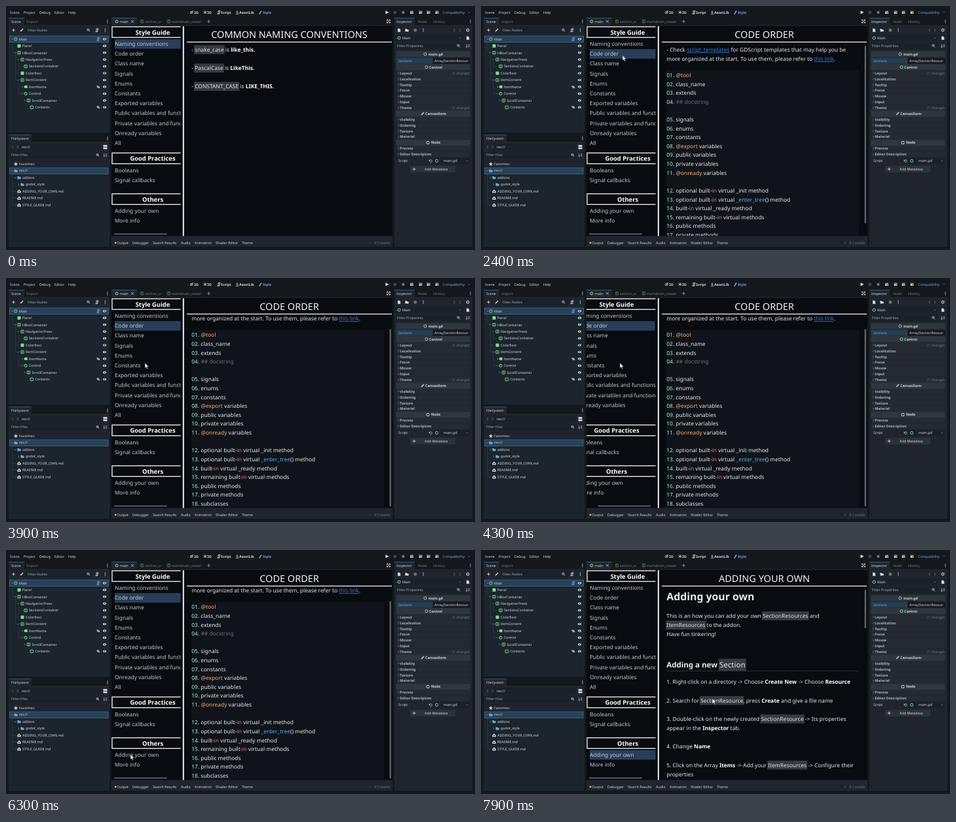
Write an HTML page that moves like this. It is 716 by 374 pixels and loops after 8000 ms.

```html
<!DOCTYPE html>
<html lang="en">
<head>
<meta charset="utf-8">
<title>Style guide addon</title>
<style>
html, body { margin: 0; width: 100%; height: 100%; overflow: hidden; background: #14181d; }
svg { display: block; width: 716px; height: 374px; font: 5.35px "Noto Sans", "Open Sans", sans-serif; text-rendering: geometricPrecision; }
text { fill: #d4d7da; white-space: pre; }
.dim { fill: #747a82; }
.hint { fill: #a3a9af; }
.blue { fill: #6ba9e0; }
.mid { text-anchor: middle; }
.bold { font-weight: 700; }
.sec { font-weight: 700; fill: #b4b8bd; }
.nav { font-size: 8.42px; fill: #c6c8ca; }
.head { font-size: 9.4px; font-weight: 700; fill: #fff; text-anchor: middle; }
.title { font-size: 14.5px; fill: #f4f5f6; text-anchor: middle; }
.body { font-size: 8.42px; fill: #e8eaec; }
.h1 { font-size: 15.8px; font-weight: 700; }
.h2 { font-size: 11.5px; font-weight: 700; }
.b { font-weight: 700; fill: #fff; }
.k { font-weight: 500; fill: #e2e4e6; }
.link { fill: #2f7fdc; text-decoration: underline; }
.num { fill: #a5efd5; }
.ann { fill: #f5ac70; }
.key { fill: #f56c80; }
.fn { fill: #57b0f8; }
.com { fill: #6b7077; }
</style>
</head>
<body>
<svg id="stage" viewBox="0 0 716 374"></svg>
<script>
const GREEN = '#83dd8c', LIGHT = '#d4d7da', GRAY = '#6d737b', BLUE = '#6ba9e0';
const OUTER = '#14181d', PANEL = '#20252d', WELL = '#1c252e', FIELD = '#1a2129', ACCENT = '#3f6f9c';
const marks = { '*': 'b', '`': 'k', '~': 'link', '^': 'num', '!': 'ann', '%': 'key', '$': 'fn', ';': 'com' };

// ---- drawing helpers, all returning markup ----
const rect = (x, y, x2, y2, fill, more = '') =>
  `<rect x="${x}" y="${y}" width="${x2 - x}" height="${y2 - y}" fill="${fill}" ${more}/>`;
const line = (d, c = LIGHT, w = 0.8) => `<path d="${d}" fill="none" stroke="${c}" stroke-width="${w}"/>`;
const shape = (d, c = LIGHT) => `<path d="${d}" fill="${c}"/>`;
const text = (x, y, s, cls = '', drop = 1.9) => `<text x="${x}" y="${y + drop}" class="${cls}">${s}</text>`;
const rich = s => s.replace(/([*`~^!%$;])(.+?)\1/g, (m, c, w) => `<tspan class="${marks[c]}">${w}</tspan>`);
const body = (y, s, cls = '') => text(283.3, y, rich(s), 'body ' + cls, cls == 'h1' ? 5.4 : cls ? 4 : 2.9);
const picked = (y, x2) => rect(5.3, y - 4.8, x2, y + 4.8, '#28405a', 'stroke="#477a9f" stroke-width=".6"');
const tab = (x, y, x2) => rect(x, y, x2, y + 11, PANEL) + rect(x, y, x2, y + .7, ACCENT);

const dot = (x, y, r, c) => `<circle cx="${x}" cy="${y}" r="${r}" fill="${c}"/>`;
const ring = (x, y, c = GREEN, r = 2.1) => `<circle cx="${x}" cy="${y}" r="${r}" fill="none" stroke="${c}" stroke-width="1"/>`;
const box = (x, y, c = GREEN) => rect(x - 2.2, y - 2.2, x + 2.2, y + 2.2, 'none', `rx=".5" stroke="${c}" stroke-width=".9"`);
const bars = (x, y, c = GREEN) => box(x, y, c) + line(`M${x} ${y - 2}v4`, c);
const solid = (x, y) => rect(x - 2.5, y - 2.5, x + 2.5, y + 2.5, GREEN, 'rx=".6"');
const tag = (x, y) => shape(`M${x - 2.8} ${y}l1.8-2.2h3.6v4.4h-3.6z`, GREEN);
const down = (x, y, c = '#8f959c') => line(`M${x - 1.3} ${y - .6}l1.3 1.3 1.3-1.3`, c, .7);
const right = (x, y, c = '#8f959c') => line(`M${x - .6} ${y - 1.3}l1.3 1.3-1.3 1.3`, c, .7);
const plus = (x, y, c = LIGHT) => line(`M${x - 2.4} ${y}h4.8M${x} ${y - 2.4}v4.8`, c, .9);
const dots = (x, y) => [-2, 0, 2].map(d => dot(x, y + d, .65, LIGHT)).join('');
const lens = (x, y) => ring(x - .6, y - .6, LIGHT, 1.5) + line(`M${x + .6} ${y + .6}l1.7 1.7`);
const eye = (x, y) => `<ellipse cx="${x}" cy="${y}" rx="2.7" ry="1.8" fill="${LIGHT}"/>` + dot(x, y, .9, WELL);
const scroll = (x, y, c = LIGHT) => line(`M${x - 1} ${y + 2.3}v-4.4h3.4M${x - 2.6} ${y + 2.3}h3.6v-4.4`, c, 1);
const folder = (x, y, c = '#68a9dc') => shape(`M${x - 2.6} ${y - 2.1}h2.2l.8 1h2.2v3.4h-5.2z`, c);
const page = (x, y, c = LIGHT) => shape(`M${x - 2} ${y - 2.6}h2.6l1.6 1.6v3.8h-4.2z`, c);
const readme = (x, y) => shape(`M${x - 2.6} ${y}l2.6-2.7 2.6 2.7v2.6h-5.2z`) + dot(x, y + .6, 1, '#333a42');
const sort = (x, y) => line(`M${x - 1.6} ${y - 2.4}v4.8m-1.2-1.3l1.2 1.3 1.2-1.3M${x + .8} ${y - 1.7}h2M${x + .8} ${y}h2M${x + .8} ${y + 1.7}h2`, LIGHT, .7);
const clap = (x, y) => rect(x - 2.4, y - .6, x + 2.4, y + 2.2, LIGHT) + line(`M${x - 2.4} ${y - 1.6}h4.8`, LIGHT, .9) + dot(x + .6, y + .8, .8, OUTER);

function menuBar() {
  let s = [['Scene', 6], ['Project', 27], ['Debug', 51], ['Editor', 74], ['Help', 95]].map(([n, x]) => text(x, 9.7, n)).join('');
  s += [['2D', 287], ['3D', 307], ['Script', 328], ['AssetLib', 356]].map(([n, x]) => text(x, 9.7, n, 'bold')).join('');
  s += text(392, 9.7, 'Style', 'bold blue') + text(667, 9.7, 'Compatibility', 'blue') + down(707, 9.7);
  s += ring(283.5, 9.7, LIGHT, 1.7) + line('M281 12l5-5');
  s += line('M304 7v5M301.5 8.3l5 2.8M306.5 8.3l-5 2.8') + scroll(325, 9.7) + line('M353 6.8v4m-1.7-1.5l1.7 1.7 1.7-1.7M350.7 12.3h4.6');
  s += line('M387 12l3-4.5', BLUE, 1.4) + dot(387.3, 11.7, 1, BLUE);
  s += shape('M579.5 7l5 2.8-5 2.8z') + line('M592.5 7.5v4.4M595 7.5v4.4', GRAY, 1.1) + rect(604.5, 7.8, 608.4, 11.7, GRAY);
  return s + [619.5, 633, 645, 658].map(x => clap(x, 9.7)).join('');
}

function sceneDock() {
  let s = rect(4, 29, 158, 194, PANEL) + tab(4, 18, 28);
  s += text(8, 23.7, 'Scene') + text(31, 23.7, 'Import', 'dim') + dots(155, 23.7);
  s += plus(11.5, 37) + line('M22 39l4-4', LIGHT, 1.6) + rect(30, 32, 132, 42, FIELD) + text(33, 37, 'Filter Nodes', 'hint');
  s += lens(126, 37) + scroll(139, 37) + dots(151.5, 37) + rect(5, 45, 157, 193, WELL) + picked(50.8, 156.7);
  s += line('M10 53v18.6h7M14.5 74v39.5h7M14.5 82h2.5M14.5 103h7M19 84v8.6h8M19 116v18.5h3', '#3b444d', .5);
  // name, icon x, icon, fold x, folded
  const rows = [
    ['Main', 15, ring, 10], ['Panel', 20, solid], ['HBoxContainer', 20, bars, 14],
    ['NavigationTrees', 25, bars, 19], ['SectionsContainer', 30, bars], ['ColorRect', 25, solid],
    ['ItemContent', 25, bars, 19], ['ItemName', 30, tag, 25, true], ['Control', 30, ring, 24.5],
    ['ScrollContainer', 34.5, bars, 29], ['Contents', 39.3, box]];
  rows.forEach(([n, x, icon, fx, folded], i) => {
    const y = 50.7 + i * 10.46;
    s += icon(x, y) + text(x + 4.9, y, n) + eye(150.5, y);
    if (fx) s += (folded ? right : down)(fx, y);
    if (n == 'ItemName' || n == 'Contents') s += text(138.5, y, '%', 'b');
  });
  return s + scroll(141, 50.7, BLUE);
}

function fileDock() {
  let s = rect(4, 208, 158, 369, PANEL) + tab(4, 197.5, 39);
  s += text(8, 203, 'FileSystem') + dots(155, 203);
  s += line('M11 214l-2 2.2 2 2.2M16.5 214l2 2.2-2 2.2', GRAY) + rect(21, 211, 145, 221, FIELD) + text(24, 216, 'res://');
  s += rect(148.5, 213, 154.5, 215.8, LIGHT) + rect(148.5, 216.6, 154.5, 219.4, LIGHT);
  s += rect(5, 223.5, 146, 233.5, FIELD) + text(8, 228.5, 'Filter Files', 'hint') + lens(140, 228.5) + sort(151.5, 228.5);
  s += rect(5, 236, 157, 368, WELL) + picked(252.8, 156);
  s += shape('M15 239l.9 2.1 2.2.2-1.7 1.5.6 2.2-2-1.2-2 1.2.6-2.2-1.7-1.5 2.2-.2z');
  s += line('M9.7 255.5v49.5h7M9.7 284h7M9.7 294.5h7', '#3b444d', .5);
  const rows = [['Favorites:', 15], ['res://', 15, folder, 9.5], ['addons', 20, folder, 14.3], ['godot_style', 25, folder, 19.3],
    ['ADDING_YOUR_OWN.md', 20, readme], ['README.md', 20, readme], ['STYLE_GUIDE.md', 20, readme]];
  rows.forEach(([n, x, icon, fx], i) => {
    const y = 242.1 + i * 10.46;
    s += text(x + 5, y, n) + (icon ? icon(x, y) : '');
    if (fx) s += (n == 'godot_style' ? right : down)(fx, y);
  });
  return s;
}

function inspector() {
  let s = rect(593, 29, 712, 369, PANEL) + tab(593, 18, 624);
  s += text(596, 23.7, 'Inspector') + text(629, 23.7, 'Node', 'dim') + text(652, 23.7, 'History', 'dim') + dots(709, 23.7);
  s += page(600, 37) + folder(612, 37, LIGHT) + rect(622.7, 34.8, 627, 39.2, GRAY) + dots(637, 37);
  s += line('M685.5 35l-2 2.2 2 2.2M692 35l2 2.2-2 2.2', GRAY) + ring(705, 37, LIGHT) + line('M705 35.8v1.4h1', LIGHT, .6);
  s += rect(595, 44, 698, 54, FIELD) + ring(600, 49) + text(605, 49, 'Main') + down(693, 49) + page(705, 49);
  s += rect(595, 56, 698, 66, FIELD) + text(597, 61, 'Filter Properties', 'hint') + lens(691, 61) + sort(705, 61);
  const cats = [['main.gd', 73.8, 640], ['Control', 93.7, 642], ['CanvasItem', 165, 636], ['Node', 209.5, 644]];
  for (const [n, y, x] of cats) {
    s += rect(595.5, y - 4.6, 708.5, y + 4.6, '#30363f') + text(656, y, n, 'mid bold');
    s += n == 'CanvasItem' ? line(`M${x - 2} ${y + 2}l4-4`, LIGHT, 1.2) : ring(x, y, n == 'Node' ? LIGHT : GREEN);
  }
  s += rect(595.5, 79.5, 651, 88.5, '#263d52') + text(599, 84, 'Sections', 'blue');
  s += rect(652, 79.5, 708.5, 88.5, '#161a20') + `<g clip-path="url(#value)">${text(654, 84, 'Array[SectionResource]')}</g>`;
  const groups = [[103, 'Layout,Localization,Tooltip,Focus,Mouse,Input,Theme'], [174, 'Visibility,Ordering,Texture,Material'], [218.3, 'Process,Editor Description']];
  for (const [top, names] of groups) names.split(',').forEach((n, i) => {
    const y = top + i * 8.85;
    s += rect(597, y - 4, 708.5, y + 4, '#242a32') + right(599, y) + text(601.3, y, n, 'sec');
    if (n == 'Layout' || n == 'Theme') s += text(681.5, y, '(1 change)', 'dim');
  });
  s += text(599, 237.4, 'Script') + rect(653, 232.8, 708.5, 242, FIELD) + ring(657.5, 237.4) + text(668, 237.4, 'main.gd') + down(704, 237.4);
  s += line('M646 235.6v2h2M646.3 237.2a2 2 0 1 1 1 2.3', LIGHT, .7);
  return s + rect(617, 245, 686, 255, '#2c323b') + plus(623, 250) + text(639, 250, 'Add Metadata');
}

function center() {
  let s = tab(161, 18, 200) + rect(161, 29, 590, 369, PANEL);
  s += ring(169, 23.7) + text(174, 23.7, 'main') + line('M191 21.7l4 4m0-4l-4 4');
  s += bars(207.5, 23.7, '#4d8256') + text(212, 23.7, 'section_ui', 'dim') + bars(248.5, 23.7, '#4d8256') + text(253, 23.7, 'markdown_viewer', 'dim');
  s += plus(309.5, 23.7, '#9299a0') + line('M581.5 23v-2h2m3 0h-2m2 0v2m0 3v-2m0 2h-2m-3 0v-2m0 2h2M581.5 21l5 5m0-5l-5 5');
  s += rect(161, 30.5, 590, 352.5, '#080b10') + rect(269.8, 31, 271.8, 352.5, '#eef0f1');
  const panels = [['Output', 169], ['Debugger', 193], ['Search Results', 224], ['Audio', 267], ['Animation', 288], ['Shader Editor', 320], ['Theme', 359.7]];
  s += panels.map(([n, x]) => text(x, 363, n)).join('') + dot(167, 363, 1.3, '#d6d45e');
  return s + text(562, 363, '4.1.stable', 'dim') + line('M554 365l3-3.5', GRAY);
}

const sections = [
  ['Style Guide', 40, 58, 'Naming conventions,Code order,Class name,Signals,Enums,Constants,Exported variables,Public variables and functions,Private variables and functions,Onready variables,All'],
  ['Good Practices', 233.5, 251.8, 'Booleans,Signal callbacks'],
  ['Others', 296, 313.9, 'Adding your own,More info']];

function nav() {
  let s = '<rect id="pick" x="166" width="116.5" height="14.6" fill="#293f59"/>';
  for (const [head, hy, top, items] of sections) {
    s += rect(162, hy - 8.2, 286, hy + 8.2, 'none', 'stroke="#e6e8ea" stroke-width="1.4"') + text(224, hy, head, 'head', 3.5);
    items.split(',').forEach((n, i) => s += text(166, top + i * 15.2, n, 'nav', 3));
  }
  return `<g clip-path="url(#navClip)"><g id="nav">${s}</g>` +
    '<rect id="hbar" x="165" y="348.6" width="81" height="2" rx="1" fill="#5a5f66"/></g>';
}

const codeLines = ['!@tool!', 'class_name', 'extends', ';## docstring;', 0, 'signals', 'enums', 'constants', '!@export! variables',
  'public variables', 'private variables', '!@onready! variables', 0, 'optional built-%in% virtual _init method',
  'optional built-%in% virtual $_enter_tree$() method', 'built-%in% virtual _ready method', 'remaining built-%in% virtual methods',
  'public methods', 'private methods', 'subclasses'];

function codePage() {
  let n = 0, s = rect(283, 98.5, 577, 374, '#10141a');
  s += body(67, '- Check ~script_templates~ for GDScript templates that may help you be');
  s += body(81, 'more organized at the start. To use them, please refer to ~this link~.');
  codeLines.forEach((c, i) => { if (c) s += body(106 + i * 13.62, `^${String(++n).padStart(2, 0)}^. ${c}`); });
  return s;
}

const addLines = [
  [72, 'Adding your own', 'h1'], [101, 'This is an how you can add your own `SectionResources` and'], [115.2, '`ItemResources` to the addon.'],
  [129.4, 'Have fun tinkering!'], [176, 'Adding a new `Section`', 'h2'],
  [202.5, '1. Right-click on a directory -> Choose *Create New* -> Choose *Resource*'],
  [230.7, '2. Search for `SectionResource`, press *Create* and give a file name'],
  [259, '3. Double-click on the newly created `SectionResource` -> Its properties'], [273.2, 'appear in the *Inspector* tab.'],
  [301.4, '4. Change *Name*'], [329.7, '5. Click on the Array *Items* -> Add your `ItemResources` -> Configure their'], [343.8, 'properties'],
  [371, "6. Finally, add the `SectionResource` to the addon's main scene."]];

const pages = [
  { title: 'COMMON NAMING CONVENTIONS', pick: 58, html: body(67, '- `snake_case` is *like_this.*') + body(95.2, '- `PascalCase` is *LikeThis.*') + body(123.3, '- `CONSTANT_CASE` is *LIKE_THIS.*') },
  { title: 'CODE ORDER', pick: 73.2, bar: 272, html: codePage() },
  { title: 'ADDING YOUR OWN', pick: 313.9, bar: 59, html: line('M283 185.5h294', '#41464e', .6) + addLines.map(a => body(...a)).join('') }];

const clip = (id, x, y, x2, y2) => `<clipPath id="${id}">${rect(x, y, x2, y2, '#000')}</clipPath>`;
const stage = document.getElementById('stage');
stage.innerHTML = clip('navClip', 161, 30.5, 266.5, 352.5) + clip('pageClip', 276, 57, 589, 352.3) + clip('value', 652, 79, 705.5, 89) +
  rect(0, 0, 716, 374, OUTER) + menuBar() + sceneDock() + fileDock() + center() + inspector() + nav() +
  pages.map((p, i) => `<g id="page${i}">${text(432.5, 43.3, p.title, 'title', 5.2)}<g clip-path="url(#pageClip)"><g id="roll${i}">${p.html}</g></g></g>`).join('') +
  rect(276, 54.6, 589, 55.9, '#eef0f1') +
  '<rect id="vbar" x="585.5" width="2.6" rx="1.3" fill="#5a5f66"/>' +
  '<path id="cursor" d="M0 0v8.2l1.9-1.7 1.3 2.9 1.4-.6-1.3-2.8h2.6z" fill="#f2f3f4" stroke="#15181c" stroke-width=".6"/>';
const el = id => document.getElementById(id);

// shaded boxes behind inline code
for (const span of stage.querySelectorAll('tspan.k')) {
  const p = span.getStartPositionOfChar(0), size = parseFloat(getComputedStyle(span).fontSize);
  const b = document.createElementNS('http://www.w3.org/2000/svg', 'rect');
  const set = { x: p.x - 1.2, y: p.y - size * 1.16, width: span.getComputedTextLength() + 2.4, height: size * 1.62, fill: '#363a41' };
  for (const k in set) b.setAttribute(k, set[k]);
  span.parentNode.before(b);
}

// ---- timeline ----
const LOOP = 8000, TICK = 100;
const pageAt = [[0, 0], [1400, 1], [6800, 2]];
const rollAt = [[0, 0], [2900, 18.6], [6800, 0], [7300, 18.5], [7800, 0]];
const slideAt = [[0, 0], [4200, 9], [4300, 17], [4400, 20], [5200, 8.8], [5300, 3.5], [5400, 1], [5500, 0]];
// start, end, control x, y, end x, y
const moves = [[400, 1200, 238, 130, 216, 75.5], [2400, 3100, 270, 78, 298, 98], [3400, 3900, 250, 150, 212, 130],
  [5600, 6300, 196, 220, 190, 313], [6800, 7300, 270, 290, 353, 227.5]];

const step = (table, t) => table.reduce((v, [at, val]) => t >= at ? val : v, 0);

function cursorAt(t) {
  let x = 241, y = 245;
  for (const [a, b, cx, cy, ex, ey] of moves) {
    const u = Math.min(1, Math.max(0, (t - a) / (b - a))), k = u * u * (3 - 2 * u), j = 1 - k;
    x = j * j * x + 2 * j * k * cx + k * k * ex;
    y = j * j * y + 2 * j * k * cy + k * k * ey;
    if (u < 1) break;
  }
  return [x, y];
}

function draw(t) {
  const now = step(pageAt, t), p = pages[now], roll = step(rollAt, t), slide = step(slideAt, t);
  pages.forEach((q, i) => el('page' + i).style.display = i == now ? '' : 'none');
  el('roll' + now).setAttribute('transform', `translate(0 ${-roll})`);
  el('pick').setAttribute('y', p.pick - 7.1);
  el('nav').setAttribute('transform', `translate(${-slide} 0)`);
  el('hbar').setAttribute('x', 165 + slide * 0.78);
  el('vbar').style.display = p.bar ? '' : 'none';
  el('vbar').setAttribute('height', p.bar || 0);
  el('vbar').setAttribute('y', 61 + roll * (now == 1 ? 0.93 : 0.2));
  el('cursor').setAttribute('transform', `translate(${cursorAt(t)})`);
  el('cursor').style.display = t < 500 ? 'none' : '';
}

const start = performance.now();
function frame() {
  const t = (performance.now() - start) % LOOP;
  draw(Math.floor(t / TICK) * TICK);
  requestAnimationFrame(frame);
}
frame();
</script>
</body>
</html>
```
